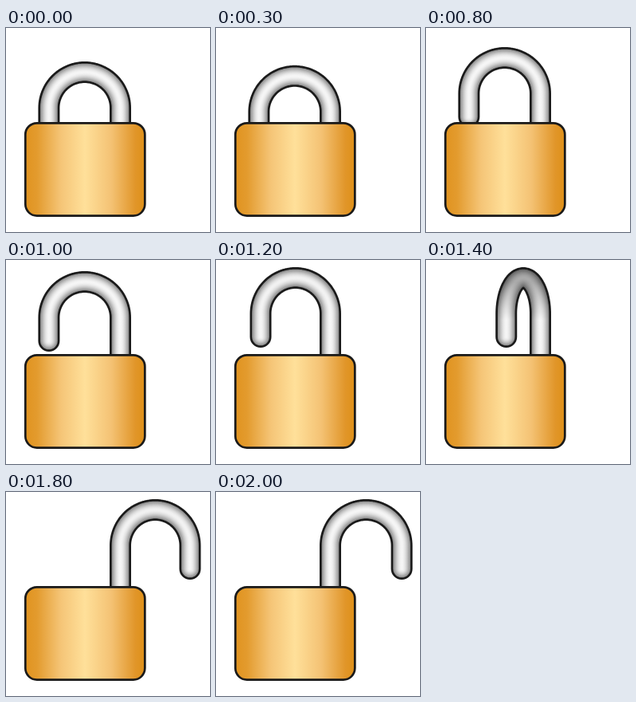
Animation of 256 by 256 pixels, one loop 2210 ms. Source, as an HTML page with a canvas:

```html
<!DOCTYPE html>
<html lang="en">
<head>
<meta charset="utf-8">
<title>Padlock</title>
<style>
  html, body { margin: 0; width: 100%; height: 100%; overflow: hidden; background: #fff; }
  canvas { display: block; width: 256px; height: 256px; }
</style>
</head>
<body>
<canvas id="stage" width="256" height="256"></canvas>
<script>
const ctx = document.getElementById('stage').getContext('2d');
const LOOP = 2210, STEP = 100, LAST = 20;
const RIGHT = 143.5, RADIUS = 44.8, TUBE = 27, LINE = 2.7;

// Height of the shackle: pressed down, then springing up
const lift = [42, 43.6, 45.2, 46.8, 48.4, 50, 42, 32.5, 24, 18, 14, 11, 9];
// Swing around the right leg in degrees, from step 11 on
const swing = [2, 12.5, 36, 61.5, 90, 118.5, 144, 167.5, 177, 180];

function pose(step) {
  const top = lift[Math.min(step, lift.length - 1)];
  const deg = step < 11 ? 0 : swing[step - 11];
  return { top, angle: deg * Math.PI / 180 };
}

function shacklePath(top, angle) {
  const rx = RADIUS * Math.cos(angle);
  const cx = RIGHT - rx, cy = top + TUBE / 2 + RADIUS;
  const path = new Path2D();
  path.moveTo(cx - rx, top + 87.5);
  for (let i = 0; i <= 60; i++) {
    const a = Math.PI * i / 60;
    path.lineTo(cx - rx * Math.cos(a), cy - RADIUS * Math.sin(a));
  }
  path.lineTo(RIGHT, 150);
  return path;
}

function drawShackle({ top, angle }) {
  const path = shacklePath(top, angle);
  const shade = 1 - 0.4 * Math.sin(angle) ** 2;
  const inner = TUBE - 2 * LINE;
  const grey = v => `rgb(${Math.round(v)},${Math.round(v)},${Math.round(v)})`;
  ctx.lineCap = ctx.lineJoin = 'round';
  ctx.lineWidth = TUBE;
  ctx.strokeStyle = '#1a1a1a';
  ctx.stroke(path);
  for (let w = inner; w > 0; w--) {
    const tone = 142 + 104 * Math.sin((1 - w / inner) * Math.PI / 2);
    const fill = ctx.createLinearGradient(0, top, 0, top + 95);
    fill.addColorStop(0.2, grey(tone * shade));
    fill.addColorStop(0.7, grey(tone));
    ctx.lineWidth = w;
    ctx.strokeStyle = fill;
    ctx.stroke(path);
  }
}

function drawBody() {
  const fill = ctx.createLinearGradient(24, 0, 174, 0);
  fill.addColorStop(0, '#e0931f');
  fill.addColorStop(0.1, '#e39b2e');
  fill.addColorStop(0.3, '#f5c577');
  fill.addColorStop(0.5, '#ffe09a');
  fill.addColorStop(0.72, '#f4c274');
  fill.addColorStop(0.92, '#e1962a');
  fill.addColorStop(1, '#de9018');
  ctx.beginPath();
  ctx.roundRect(24.3, 119.3, 150, 116.3, 14.5);
  ctx.fillStyle = fill;
  ctx.fill();
  ctx.lineWidth = LINE;
  ctx.strokeStyle = '#1a1a1a';
  ctx.stroke();
}

let shown = -1;
const start = performance.now();

function tick() {
  const t = (performance.now() - start) % LOOP;
  const step = Math.min(LAST, Math.floor(t / STEP));
  if (step !== shown) {
    shown = step;
    ctx.fillStyle = '#fff';
    ctx.fillRect(0, 0, 256, 256);
    drawShackle(pose(step));
    drawBody();
  }
  requestAnimationFrame(tick);
}
tick();
</script>
</body>
</html>
```
